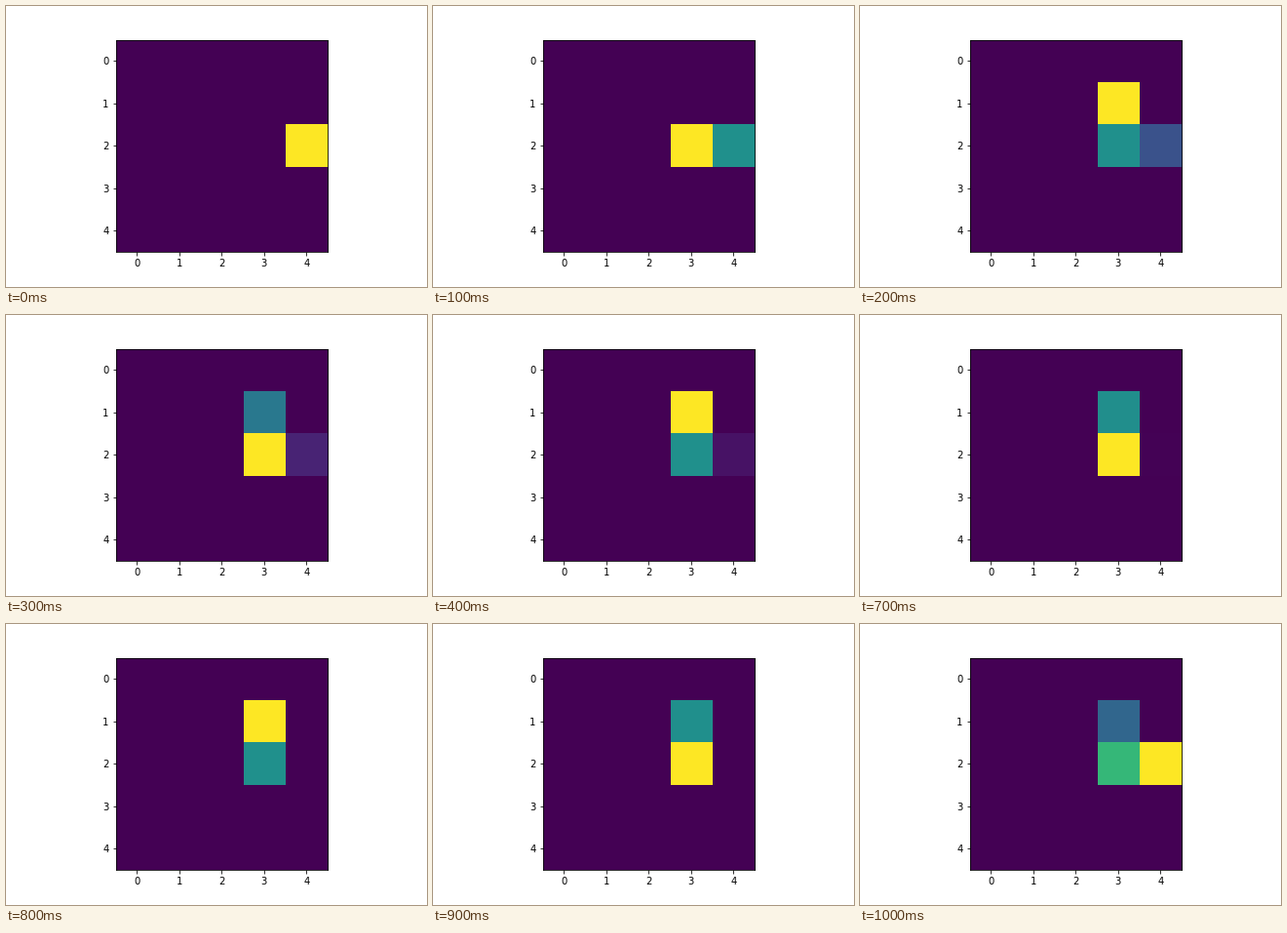
Recreate the animation shown at these times as a matplotlib script. Size 432 by 288 pixels, loop 1100 ms.

```python
import numpy as np
import matplotlib.pyplot as plt
from matplotlib.animation import FuncAnimation

SIZE = 5
STEPS = 11
DECAY = 0.5


def position(step):
    """Cell (row, column) of the walker: in, back and forth, then out."""
    if step in (0, STEPS - 1):
        return 2, 4
    return (2, 3) if step % 2 else (1, 3)


def trail(step):
    """Visits so far, each fading by half per step."""
    grid = np.zeros((SIZE, SIZE))
    for s in range(step + 1):
        grid *= DECAY
        grid[position(s)] += 1
    return grid


fig, ax = plt.subplots(figsize=(6, 4), dpi=72, facecolor="white")
fig.subplots_adjust(left=0.125, right=0.9, bottom=0.125, top=0.88)
image = ax.imshow(trail(0), cmap="viridis", interpolation="nearest")
ax.set_xticks(range(SIZE))
ax.set_yticks(range(SIZE))


def update(step):
    image.set_data(trail(step))
    image.autoscale()
    return [image]


anim = FuncAnimation(fig, update, frames=STEPS, interval=100,
                     repeat=True, repeat_delay=0)
plt.show()
```
